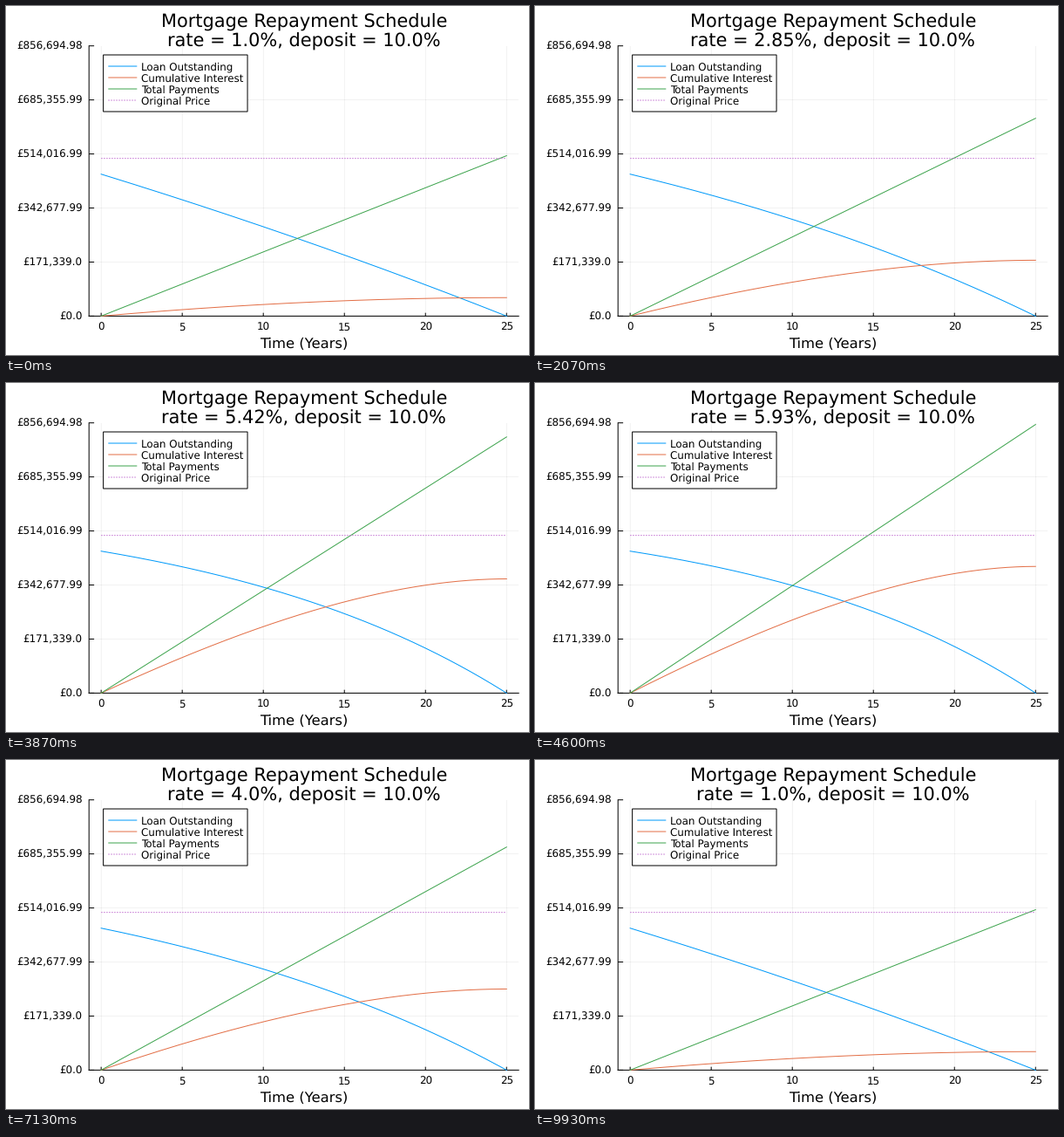
Recreate the animation shown at these times as a matplotlib script. Size 600 by 400 pixels, loop 9990 ms.

```python
import numpy as np
import matplotlib.pyplot as plt
from matplotlib.animation import FuncAnimation
from matplotlib.lines import Line2D
from matplotlib.patches import Rectangle

plt.rcParams.update({
    "font.family": "DejaVu Sans",
    "text.hinting": "none",
    "path.snap": False,
    "lines.dash_capstyle": "butt",
    "lines.scale_dashes": False,
})

W, H, DPI = 600, 400, 100
FRAMES, LOOP_MS = 150, 9990
LEFT, RIGHT, TOP, BOTTOM = 95.2, 588.2, 45.7, 355.4
PLOT_W, PLOT_H = RIGHT - LEFT, BOTTOM - TOP
SMALL, MEDIUM, LARGE = 11.9, 16.37, 20.83

PRICE, DEPOSIT, YEARS = 500_000, 10.0, 25
LOAN = PRICE * (1 - DEPOSIT / 100)
X_MIN, X_MAX = -0.03 * YEARS, 1.03 * YEARS
Y_MAX = 856_694.983

BLUE, ORANGE, GREEN, PURPLE = "#009afa", "#e36f47", "#3ea44e", "#c371d2"

months = np.arange(YEARS * 12 + 1)
years = months / 12


def pt(px):
    return px * 72 / DPI


def rate_at(frame):
    """Yearly rate in percent, swinging between 1 and 6 once per loop."""
    return 3.5 - 2.5 * np.cos(2 * np.pi * frame / (FRAMES - 1))


def schedule(rate):
    """Loan left, interest so far and payments so far, month by month."""
    growth = (1 + rate / 100) ** (1 / 12)
    payment = LOAN * (growth - 1) / (1 - growth ** -months[-1])
    paid = payment * months
    owed = LOAN * growth ** months - payment * (growth ** months - 1) / (growth - 1)
    return owed, paid - (LOAN - owed), paid


def money(value):
    whole, cents = str(round(value, 2)).split(".")
    return f"£{int(whole):,}.{cents}"


fig = plt.figure(figsize=(W / DPI, H / DPI), dpi=DPI, facecolor="white")


def label(x, y, text, size, ha="center"):
    """Text with its baseline at pixel (x, y), measured from the top left."""
    return fig.text(x / W, 1 - y / H, text, fontsize=pt(size), ha=ha,
                    va="baseline", color="black")


ax = fig.add_axes([LEFT / W, 1 - BOTTOM / H, PLOT_W / W, PLOT_H / H])
ax.set_xlim(X_MIN, X_MAX)
ax.set_ylim(0, Y_MAX)
x_ticks = np.arange(0, YEARS + 1, 5)
y_ticks = np.linspace(0, Y_MAX, 6)
ax.set_xticks(x_ticks)
ax.set_yticks(y_ticks)
ax.tick_params(length=0, labelbottom=False, labelleft=False)
ax.grid(True, color="black", alpha=0.1, linewidth=pt(0.5))
ax.set_axisbelow(True)
for side in ("top", "right"):
    ax.spines[side].set_visible(False)
for side in ("left", "bottom"):
    ax.spines[side].set_linewidth(pt(1))

# Inward ticks, in proportion to the plot area
tick = dict(color="black", linewidth=pt(1), clip_on=False)
ax.vlines(x_ticks, 0, 0.012 * Y_MAX, **tick)
ax.hlines(y_ticks, X_MIN, X_MIN + 0.012 * (X_MAX - X_MIN), **tick)

for t in x_ticks:
    label(LEFT + (t - X_MIN) / (X_MAX - X_MIN) * PLOT_W, 371.8, str(t), SMALL)
for v in y_ticks:
    label(87.5, BOTTOM - v / Y_MAX * PLOT_H + 4.4, money(v), SMALL, "right")

mid = (LEFT + RIGHT) / 2
label(mid, 392.3, "Time (Years)", MEDIUM)
label(mid, 24.2, "Mortgage Repayment Schedule", LARGE)
subtitle = label(mid, 46.4, "", LARGE)

solid = dict(linewidth=pt(1))
dotted = dict(linewidth=pt(1), linestyle=(0, (pt(1.5), pt(1.5))))
series = [
    ("Loan Outstanding", BLUE, solid),
    ("Cumulative Interest", ORANGE, solid),
    ("Total Payments", GREEN, solid),
    ("Original Price", PURPLE, dotted),
]
curves = [ax.plot(years, np.full(len(years), PRICE), color=color, zorder=3,
                  clip_on=False, **style)[0]
          for _, color, style in series]

# Legend, set in from the corner by a thirtieth of the plot area
row = 13
box_x, box_y = LEFT + PLOT_W / 30, TOP + PLOT_H / 30
box_w, box_h = 165.4, row * (len(series) + 1)
fig.add_artist(Rectangle((box_x / W, 1 - (box_y + box_h) / H), box_w / W, box_h / H,
                         transform=fig.transFigure, facecolor="white",
                         edgecolor="black", linewidth=pt(1)))
for i, (name, color, style) in enumerate(series, 1):
    y = box_y + row * i
    fig.add_artist(Line2D([117.3 / W, 150.3 / W], [1 - y / H] * 2, color=color,
                          solid_capstyle="butt", **style))
    label(155, y + 4.4, name, SMALL, "left")


def update(frame):
    rate = rate_at(frame)
    for curve, values in zip(curves, schedule(rate)):
        curve.set_ydata(values)
    subtitle.set_text(f"rate = {round(float(rate), 2)}%, deposit = {DEPOSIT}%")
    return [*curves, subtitle]


anim = FuncAnimation(fig, update, frames=FRAMES, interval=LOOP_MS / FRAMES,
                     repeat=True, repeat_delay=0, blit=False)
plt.show()
```
